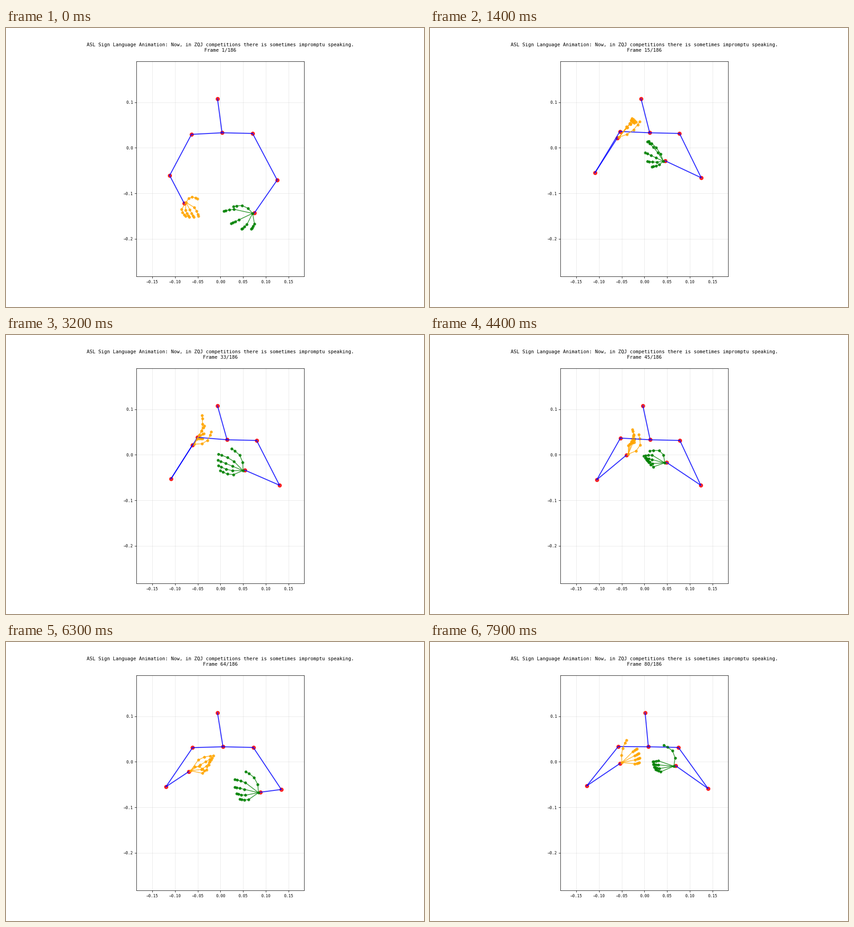
Animation, 917 px wide and 611 px high, one loop 8000 ms. Source, as a matplotlib script:

```python
import numpy as np
import matplotlib.pyplot as plt
from matplotlib.animation import FuncAnimation
from matplotlib.collections import LineCollection
from matplotlib.ticker import MultipleLocator

W, H, DPI = 917, 611, 72            # at 72 dpi one point is one pixel
FRAMES, STEP = 80, 100
K = 76.4 / 72                       # scale for line and marker sizes
ORIGIN, UNIT = (470.5, 262.5), 996  # stage position of (0, 0), pixels per unit

plt.rcParams.update({
    "font.family": "DejaVu Sans Mono",
    "axes.linewidth": 0.8 * K,
    "grid.linewidth": 0.8 * K,
})

# Points are complex numbers in stage pixels, y down.
keys = []


def key(ms, head, neck, elbows, wrists, left, right):
    """Hands: thumb, index and little fingertip from the wrist, palm share, arch."""
    keys.append((ms, np.array([head, neck, *elbows, *wrists, *left, *right], complex)))


key(0, 464, 474, (359+323j, 595+333j), (391+384j, 545+405j),
    (25-8j, 27+30j, -1+30j, 0.5, -0.3), (-42-15j, -63-5j, -3+34j, 0.65, 0.2))
key(1400, 463, 482, (362+317j, 595+328j), (411+241j, 516+291j),
    (45-34j, 28-41j, 37-33j, 0.55, 0.12), (-32-44j, -35-43j, -25+12j, 0.4, 0.1))
key(3200, 464, 485, (362+315j, 600+329j), (409+241j, 524+296j),
    (37-27j, 17-63j, 18-12j, 0.5, 0.25), (-25-48j, -54-36j, -50+0j, 0.42, 0.18))
key(4400, 467, 483, (366+317j, 594+329j), (431+263j, 519+279j),
    (23-43j, 9-54j, 13-26j, 0.6, 0.3), (-33-26j, -46-15j, -37-4j, 0.65, 0.35))
key(5500, 466, 479, (364+308j, 598+326j), (424+242j, 532+288j),
    (39-37j, 32-62j, 32-25j, 0.55, 0.25), (-24-49j, -42-49j, -41-15j, 0.45, 0.2))
key(6300, 464, 476, (351+317j, 604+323j), (401+284j, 558+329j),
    (30+0j, 50-33j, 42-20j, 0.45, -0.35), (-28-46j, -52-29j, -41+14j, 0.6, 0.18))
key(6600, 466, 476, (349+317j, 605+323j), (389+322j, 568+367j),
    (30+0j, 50-33j, 42-20j, 0.45, -0.35), (-28-46j, -52-29j, -41+14j, 0.6, 0.18))
key(7900, 472, 479, (344+315j, 610+321j), (417+266j, 539+271j),
    (10-49j, 33-30j, 38+0j, 0.75, -0.1), (-22-46j, -46-10j, -40+7j, 0.75, 0.25))

times = [k[0] for k in keys]


def state(ms):
    i = min(np.searchsorted(times, ms, side="right"), len(keys) - 1)
    (t0, a), (t1, b) = keys[i - 1], keys[i]
    u = (ms - t0) / (t1 - t0)
    return a + (b - a) * (1 - (1 - u) ** 2)


def hand(wrist, thumb, index, little, palm, arch):
    """Fan the fingers from index to little; outer fingers arch away from the middle."""
    tips = [thumb] + [index * (little / index) ** (f / 3) for f in range(4)]
    step = 1 - (1 - np.arange(4) / 3) ** 1.5
    joints = [wrist]
    for f, tip in enumerate(tips):
        start = palm.real if f else 0.3
        t = start + (1 - start) * step
        bend = arch.real * (1 - f / 2) * np.sin(np.pi * t)
        joints.extend(wrist + tip * (t + 1j * bend))
    return joints


def pose(ms):
    """Joints of body, left hand and right hand in axes units."""
    s = state(ms)
    head, neck, elbow_l, elbow_r, wrist_l, wrist_r = s[:6]
    sway = neck - 474
    body = [head + 155j, neck + 229.5j,
            407 + 233j + (1.2 - 0.8j) * sway, elbow_l, wrist_l,
            541 + 231j + 0.8 * sway, elbow_r, wrist_r]
    parts = body, hand(wrist_l + 4 - 2j, *s[6:11]), hand(wrist_r - 4 + 1j, *s[11:])
    return [(np.column_stack([np.real(p), np.imag(p)]) - ORIGIN) / (UNIT, -UNIT)
            for p in parts]


fig = plt.figure(figsize=(W / DPI, H / DPI), dpi=DPI, facecolor="white")
ax = fig.add_subplot()
ax.set_aspect("equal")
ax.set_xlim(-0.1851, 0.1841)
ax.set_ylim(-0.2825, 0.1899)


def ticks(axis, gap, digits, pad):
    def label(v, _):
        return f"{round(v, digits) + 0.0:.{digits}f}".replace("-", "\u2212")
    axis.set_major_locator(MultipleLocator(gap))
    axis.set_major_formatter(label)
    axis.set_tick_params(labelsize=8.3 * K, length=3.5 * K, width=0.8 * K, pad=pad * K)


ticks(ax.xaxis, 0.05, 2, 4.5)
ticks(ax.yaxis, 0.1, 1, 3.5)
ax.grid(alpha=0.3)


def heading(text, y):
    return fig.text(0.5125, 1 - y / H, text, size=9.95 * K, ha="center", va="baseline")


heading("ASL Sign Language Animation: Now, in ZQJ competitions "
        "there is sometimes impromptu speaking.", 40)
counter = heading("", 52)

BONES = [(0, 1), (1, 2), (2, 3), (3, 4), (1, 5), (5, 6), (6, 7)]
FINGERS = [(0 if j % 4 == 1 else j - 1, j) for j in range(1, 21)]


def limb(edges, dot, line, size, width):
    dots = ax.scatter([], [], s=size * K * K, c=dot, alpha=0.8, linewidths=1.5 * K)
    lines = LineCollection([], colors=line, linewidths=width * K, alpha=0.8,
                           capstyle="projecting", zorder=2)
    ax.add_collection(lines, autolim=False)
    return np.array(edges), dots, lines


limbs = [
    limb(BONES, "red", "blue", 50, 2),
    limb(FINGERS, "orange", "orange", 20, 1.5),
    limb(FINGERS, "green", "green", 20, 1.5),
]


def draw(n):
    counter.set_text(f"Frame {n + 1}/186")
    for joints, (edges, dots, lines) in zip(pose(n * STEP), limbs):
        dots.set_offsets(joints)
        lines.set_segments(joints[edges])
    return [counter]


anim = FuncAnimation(fig, draw, frames=FRAMES, interval=STEP, repeat=True,
                     repeat_delay=0, blit=False)
plt.show()
```
